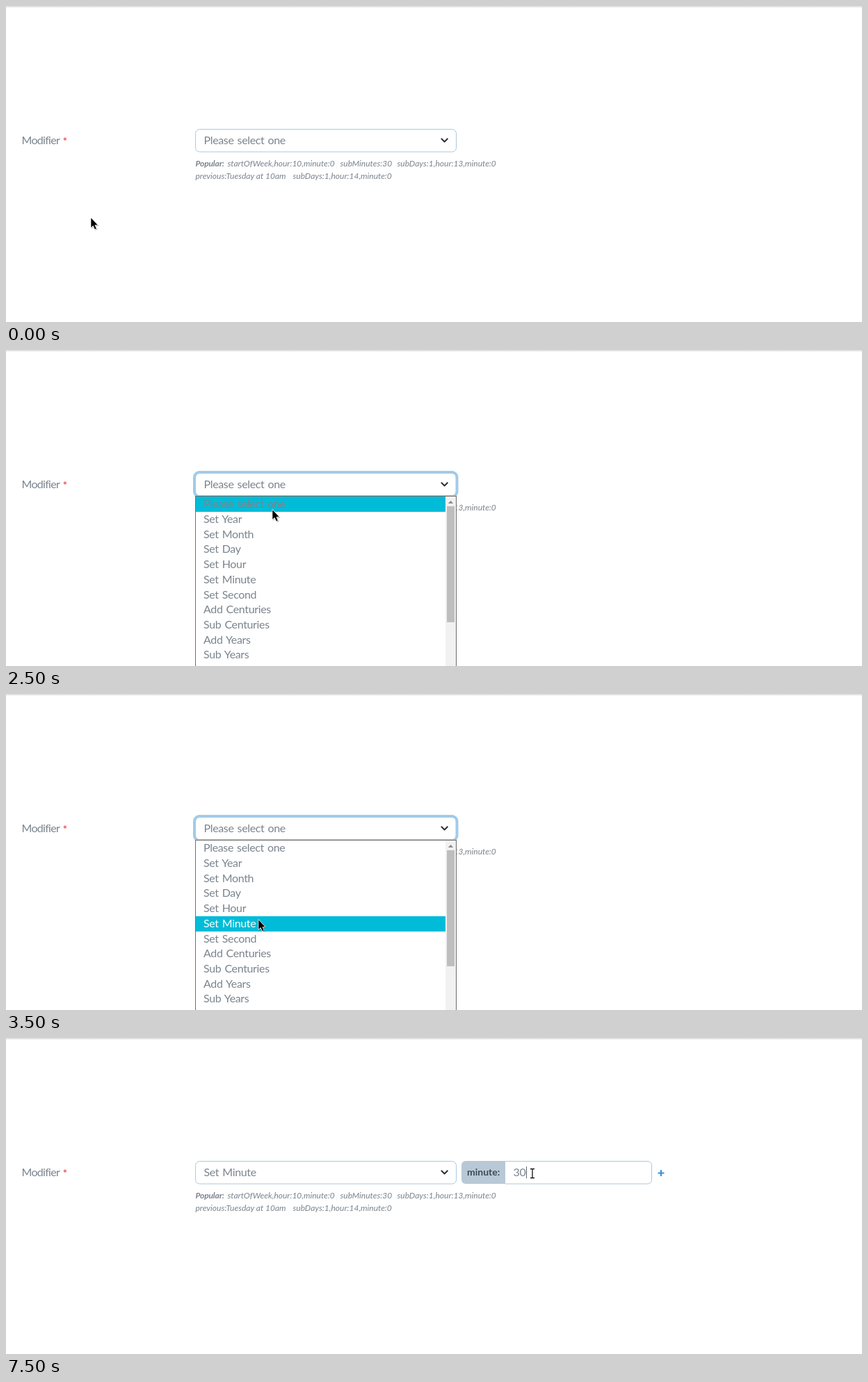
Animation of 1231 by 455 pixels, one loop 8000 ms. Source, as an HTML page:

```html
<!DOCTYPE html>
<html lang="en">
<head>
<meta charset="utf-8">
<title>Modifier form</title>
<style>
  html, body { margin: 0; width: 100%; height: 100%; overflow: hidden; background: #fff; }
  svg { display: block; width: 1231px; height: 455px; }
  text { font: 16px Lato, "Open Sans", sans-serif; letter-spacing: -.35px; word-spacing: 1.3px; fill: #7a848e; white-space: pre; }
  .label { letter-spacing: -.7px; }
  .hint text { font-size: 12px; font-style: italic; letter-spacing: 0; word-spacing: 0; }
  .hint .bold { font-weight: 700; letter-spacing: -.15px; }
  .hint .hover { text-decoration: underline; }
  .prefix { font-size: 14px; font-weight: 700; letter-spacing: 0; fill: #3d4852; }
  .box { fill: none; stroke: #adc8db; }
  .cursor { stroke-linejoin: round; filter: drop-shadow(1px 1px .7px rgba(0, 0, 0, .25)); }
  .cursor path { stroke: #fff; stroke-width: 1.4px; paint-order: stroke; }
</style>
</head>
<body>
<svg viewBox="0 0 1231 455">
  <defs>
    <linearGradient id="shade" x2="0" y2="1">
      <stop stop-color="#d9d9d9"/>
      <stop offset="1" stop-color="#fff"/>
    </linearGradient>
    <path id="ibeam" d="M-3-5.5h2.2L0-4.7l.8-.8H3M0-5V7M-3 7.5h2.2L0 6.7l.8.8H3" fill="none"/>
  </defs>
  <rect width="1231" height="3" fill="url(#shade)"/>

  <text class="label" x="22.5" y="199">Modifier</text>
  <text x="81.5" y="200" style="fill:#e3342f">*</text>

  <rect class="box" x="272.5" y="177.5" width="375" height="32.5" rx="6"/>
  <rect id="ring" x="271" y="176" width="377.5" height="35" rx="7" fill="none" stroke="#a1cbe8" stroke-width="4"/>
  <text id="choice" x="284.5" y="199"></text>
  <path d="M626.4 191.3l4.2 4.2 4.2-4.2" fill="none" stroke="#2b3036" stroke-width="2" stroke-linecap="round" stroke-linejoin="round"/>

  <g class="hint">
    <text class="bold" x="272.5" y="231">Popular:</text>
    <text x="318.5" y="231">startOfWeek,hour:10,minute:0</text>
    <text x="480.5" y="231">subMinutes:30</text>
    <text id="link" x="562.5" y="231">subDays:1,hour:13,minute:0</text>
    <text x="272.5" y="249">previous:Tuesday at 10am</text>
    <text x="412.5" y="249">subDays:1,hour:14,minute:0</text>
  </g>

  <g id="field">
    <path d="M718 177H661a6 6 0 0 0-6 6v21a6 6 0 0 0 6 6h57z" fill="#b9c8d7"/>
    <path class="box" d="M718 177.5h205a5.5 5.5 0 0 1 5.5 5.5v21.5a5.5 5.5 0 0 1-5.5 5.5H718"/>
    <text class="prefix" x="663" y="198">minute:</text>
    <path d="M937.5 194.5h9M942 190v9" stroke="#3490dc" stroke-width="2"/>
    <text id="value" x="729.5" y="199"></text>
    <rect id="caret" y="185" width="1" height="17" fill="#5c656d"/>
  </g>

  <g id="menu">
    <rect x="272.5" y="210.5" width="375" height="260" fill="#fff" stroke="#6d6d6d"/>
    <rect id="mark" x="273" width="359" height="22" fill="#00bcd8"/>
    <g id="items"></g>
    <rect x="632" y="211" width="15" height="244" fill="#f1f1f1"/>
    <path d="M635.8 221h7.4l-3.7-4z" fill="#8b8b8b"/>
    <rect x="634" y="225" width="11" height="167" fill="#bebebe"/>
  </g>

  <g id="arrow" class="cursor">
    <path d="M.3.3V13.8l3.1-2.8 2.3 5.3 2.1-.9-2.3-5.1h4.2z"/>
  </g>
  <g id="hand" class="cursor">
    <path d="M-2 1.2Q-1.8 0-.6 0T.9 1.2V4.2Q2.2 3.6 3 4.6 4.2 4 5 5q1.4-.5 2 .6V9.2L5.8 11.4V13H-2.4V11.2L-5.4 7.4q-.5-1.4.8-1.6 1 0 2.6 1.6z"/>
  </g>
  <g id="beam">
    <use href="#ibeam" stroke="#fff" stroke-width="3"/>
    <use href="#ibeam" stroke="#111" stroke-width="1.3"/>
  </g>
</svg>
<script>
  const LOOP = 8000, STEP = 100, ROW = 21.7, LIST_TOP = 211;
  const OPEN = 1700, CHOOSE = 3900, FOCUS = 5400, TYPE = 7400;
  const $ = id => document.getElementById(id);
  const options = ["Please select one", "Set Year", "Set Month", "Set Day", "Set Hour", "Set Minute",
    "Set Second", "Add Centuries", "Sub Centuries", "Add Years", "Sub Years"];

  const linear = u => u;
  const smooth = u => u * u * (3 - 2 * u);
  const speedUp = u => u ** 1.6;
  const slowDown = u => 1 - (1 - u) ** 1.6;

  // The pointer's stops; each easing leads to its stop from the one before.
  const stops = [
    { t: 100, x: 122, y: 305 },
    { t: 700, x: 392, y: 188, ease: smooth },
    { t: 900, x: 371, y: 188, ease: linear },
    { t: 2200, x: 371, y: 188, ease: linear },
    { t: 2500, x: 383, y: 230, ease: linear },
    { t: 2700, x: 374, y: 286, ease: linear },
    { t: 3500, x: 363, y: 325, ease: slowDown },
    { t: 4100, x: 363, y: 325, ease: linear },
    { t: 4500, x: 697, y: 225, ease: speedUp },
    { t: 4900, x: 757, y: 194, ease: slowDown }
  ];

  options.forEach((name, i) => {
    const el = document.createElementNS("http://www.w3.org/2000/svg", "text");
    el.setAttribute("x", 284);
    el.setAttribute("y", Math.round(227.3 + i * ROW));
    el.textContent = name;
    $("items").append(el);
  });

  const show = (id, on) => { $(id).style.display = on ? "" : "none"; };

  function pointer(t) {
    const next = stops.findIndex(stop => stop.t > t);
    if (next < 0) return stops[stops.length - 1];
    if (next === 0) return stops[0];
    const a = stops[next - 1], b = stops[next];
    const k = b.ease((t - a.t) / (b.t - a.t));
    return { x: Math.round(a.x + (b.x - a.x) * k), y: Math.round(a.y + (b.y - a.y) * k) };
  }

  function drawMenu(t) {
    // The highlight follows the pointer one step late.
    const row = Math.max(0, Math.floor((pointer(t - STEP).y - LIST_TOP) / ROW));
    show("menu", t >= OPEN && t < CHOOSE);
    $("mark").setAttribute("y", Math.round(LIST_TOP + row * ROW));
    [...$("items").children].forEach((el, i) => { el.style.fill = i && i === row ? "#fff" : ""; });
  }

  function drawField(t) {
    const value = "30".slice(0, Math.max(0, (t - TYPE) / STEP + 1));
    show("ring", t >= OPEN && t < FOCUS);
    $("choice").textContent = options[t < CHOOSE ? 0 : 5];
    show("field", t >= CHOOSE);
    $("value").textContent = value;
    $("caret").setAttribute("x", 730 + value.length * 9);
    show("caret", t >= FOCUS && (t < 6000 || t >= 6600));
  }

  function drawPointer(t) {
    const { x, y } = pointer(t);
    const overLink = x > 562 && x < 706 && y > 221 && y < 237;
    const overInput = x > 718 && y < 210;
    const shape = overLink ? "hand" : overInput ? "beam" : "arrow";
    for (const id of ["arrow", "hand", "beam"]) show(id, id === shape);
    $(shape).setAttribute("transform", `translate(${x} ${y})`);
    $("link").classList.toggle("hover", overLink);
  }

  const origin = performance.now();
  function frame() {
    const elapsed = (performance.now() - origin) % LOOP;
    const t = Math.floor(elapsed / STEP) * STEP;
    drawMenu(t);
    drawField(t);
    drawPointer(t);
    requestAnimationFrame(frame);
  }
  frame();
</script>
</body>
</html>
```
